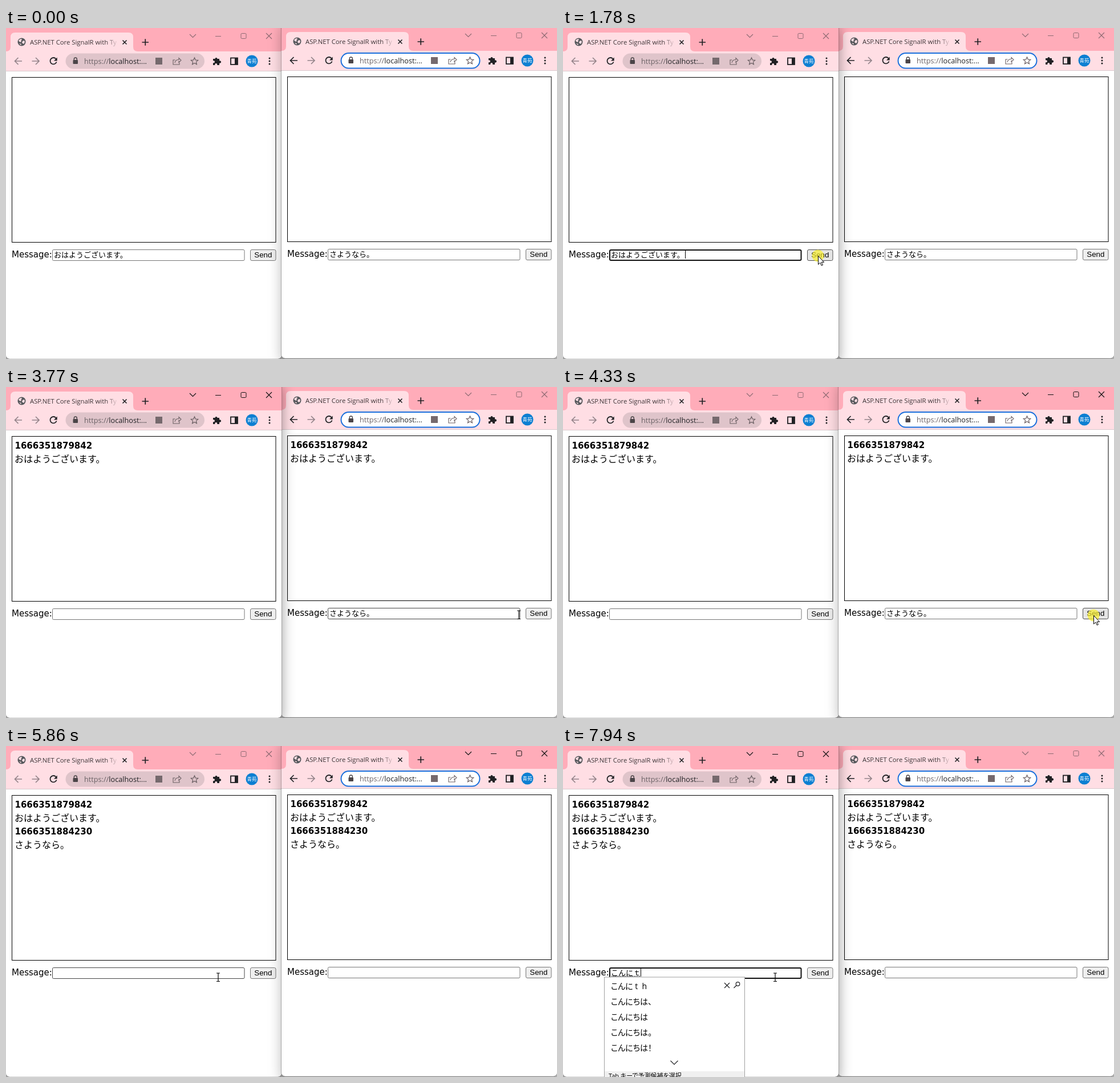
Recreate the animation shown at these times as an HTML page. Size 966x580 px, loop 8 s.

```html
<!DOCTYPE html>
<html lang="ja">
<head>
<meta charset="utf-8">
<title>Chat demo</title>
<style>
html, body { margin: 0; width: 100%; height: 100%; overflow: hidden; background: #c4c4c4; }
svg { display: block; width: 966px; height: 580px; }
text { white-space: pre; }
.ui { font-family: "Open Sans", "Noto Sans CJK JP", "Noto Sans CJK", sans-serif; }
.page { font: 15px "DejaVu Sans", sans-serif; }
.bold { font-weight: bold; }
.jp { font: 16px "Noto Sans CJK JP", "Noto Sans CJK", sans-serif; }
.field { font-size: 13px; }
.send { font: 13.333px "Liberation Sans", Arial, sans-serif; }
.ime { font-size: 14px; font-feature-settings: "palt"; }
.line { fill: none; stroke: #202124; }
</style>
</head>
<body>
<svg id="stage" viewBox="0 0 966 580"></svg>
<script>
const stage = document.getElementById('stage');
const LOOP = 8000;
const HELLO = 'おはようございます。', BYE = 'さようなら。';

// Pointer keys: time, x, y
const pointerPath = [
  [660, 522, 559], [950, 492, 486], [1250, 451, 408], [1450, 447, 399],
  [2650, 447, 399], [2850, 500, 421], [3200, 740, 424], [3490, 828, 425],
  [3500, 828, 425], [3770, 899, 399], [3900, 922, 397], [4200, 930, 400],
  [4610, 930, 400], [4810, 890, 407], [5200, 560, 421], [5440, 448, 422],
  [5640, 395, 412], [5860, 372, 405]
];
const typed = [[7000, 'ｋ'], [7130, 'こ'], [7400, 'こｎ'], [7540, 'こん'], [7600, 'こんに'], [7940, 'こんにｔ']];
const candidates = [
  [7200, ['これ h', 'Tavu', 'こっちで', 'コミュニケーション', 'こんにちは']],
  [7670, ['こんに t  h', 'こんにちは、', 'こんにちは', 'こんにちは。', 'こんにちは！']]
];

const between = (t, a, b) => t >= a && t < b;
const latest = (list, t) => list.reduce((value, [at, next]) => t >= at ? next : value, null);
const text = (x, y, cls, content, extra = '') => `<text x="${x}" y="${y}" class="${cls}" ${extra}>${content}</text>`;
const line = (d, width = 1, color = '#202124') => `<path class="line" d="${d}" stroke-width="${width}" style="stroke:${color}"/>`;
const rect = (x, y, w, h, fill, extra = '') => `<rect x="${x}" y="${y}" width="${w}" height="${h}" fill="${fill}" ${extra}/>`;

function pointerAt(t) {
  const next = pointerPath.findIndex(key => key[0] > t);
  if (next < 0) return pointerPath.at(-1).slice(1);
  if (!next) return pointerPath[0].slice(1);
  const [t0, x0, y0] = pointerPath[next - 1], [t1, x1, y1] = pointerPath[next];
  const k = (t - t0) / (t1 - t0);
  return [x0 + (x1 - x0) * k, y0 + (y1 - y0) * k];
}

function browserBar(right, active) {
  const control = active ? '#111' : '#8d6a72', icon = '#6b5f63';
  return rect(-1, -9, 485, 50, '#ffacb9') + rect(-1, 41, 485, 34, '#ffdee4') +
    '<path d="M0 41Q8 41 8 33V16Q8 8 16 8H215Q223 8 223 16V33Q223 41 231 41Z" fill="#ffdee4"/>' +
    '<circle cx="27.5" cy="24.5" r="7" fill="#55585c"/>' +
    '<path d="M22 22q2-3 5-3q2 2-1 3l1 2q-3 2-5-2M29 23l3-1q2 3-1 6l-3-2M23 27l4 1-1 2" fill="#ffdee4"/>' +
    text(42, 29, 'ui', 'ASP.NET Core SignalR with Ty', 'font-size="11.3" fill="url(#fade)"') +
    line('M204.5 21.5l7 7m0-7l-7 7', 1.6) + line('M238.500 25h11.500m-5.750-5.750v11.500', 1.7) +
    line('M322 11l5.500 5.500 5.500-5.500M367 14.500h10M456 9l10 10m0-10l-10 10', 1.1, control) +
    `<rect x="412" y="9.500" width="9" height="9" rx="1.500" class="line" style="stroke:${control}"/>` +
    line('M28 58H15.500m6-6l-6 6 6 6', 1.7, right ? '#202124' : '#94848a') +
    line('M45.500 58H58m-6-6l6 6-6 6', 1.7, '#94848a') +
    line('M87.500 54A5.700 5.700 0 1 0 88.600 59.500', 1.8) + '<path d="M89.700 51.500V57.500H84Z" fill="#202124"/>' +
    (right
      ? rect(104.5, 45, 243, 26.500, '#fff', 'rx="13.300" stroke="#1a6fdc" stroke-width="2"')
      : rect(104.5, 44.500, 243.500, 27, '#dfc4ca', 'rx="13.500"')) +
    rect(117.5, 56, 8.500, 7, '#4b4548', 'rx="1"') + line('M119.300 56v-1.500a2.500 2.500 0 0 1 5 0V56', 1.4, '#4b4548') +
    text(137, 62.500, 'ui', '<tspan fill="#6b6266">https://</tspan>localhost:...', 'font-size="12.700" fill="#202124"') +
    rect(262, 52, 12, 12, '#75696d') +
    line('M296.500 56h-3.500v8h11v-3M296 61q1-5.500 7-5.500v-3l4 4-4 4v-3', 1.1, icon) +
    line('M330.500 52l1.800 4.100 4.400.400-3.300 2.900 1 4.400-3.900-2.300-3.900 2.300 1-4.400-3.300-2.900 4.400-.400Z', 1.2, icon) +
    '<path d="M363 54h3.500a2 2 0 1 1 4 0H374v3.500a2.200 2.200 0 1 1 0 4V65h-4a2 2 0 1 0-3.500 0H363v-4a2 2 0 1 0 0-3.500Z" fill="#202124"/>' +
    rect(394, 52.500, 12, 11.500, 'none', 'stroke="#202124" stroke-width="1.800"') + rect(401, 52.500, 5, 11.500, '#202124') +
    '<circle cx="431" cy="58" r="10.500" fill="#0c7fd2"/>' +
    text(431, 61.200, 'ui', '青苑', 'font-size="8.500" fill="#fff" text-anchor="middle"') +
    [53, 58, 63].map(y => `<circle cx="462" cy="${y}" r="1.500" fill="#202124"/>`).join('') +
    rect(-1, 75, 485, 1, '#d8c8cc');
}

function browserWindow(s) {
  const { right, messages, value, focus, caret, hoverInput, hoverSend } = s;
  const log = messages.map(([stamp, body], i) =>
    text(15.5, 108 + i * 46.500, 'page bold', stamp) + text(15, 132 + i * 46.500, 'jp', body)).join('');
  const input = focus
    ? rect(82, 389, 335.500, 18, '#fff', 'rx="2" stroke="#101010" stroke-width="2"')
    : rect(81.5, 388.500, 336.500, 19, '#fff', `rx="2" stroke="${hoverInput ? '#454545' : '#767676'}"`);
  const send = rect(428.5, 388.500, 44.500, 19, hoverSend ? '#e5e5e5' : '#efefef', `rx="2.500" stroke="${hoverSend ? '#4f4f4f' : '#767676'}"`);
  return `<g transform="translate(${right ? '483 -1' : '0 0'})">` +
    rect(-0.5, -10, 484, 590, '#fff', `rx="7" style="filter:drop-shadow(0 7px 11px ${right ? '#0004' : '#0006'})"`) +
    browserBar(right, s.active) +
    rect(10.5, 86.500, 462.500, 289, '#fff', 'stroke="#000"') + log +
    text(10, 402, 'page', 'Message:') + input + text(84, 401.500, 'jp field', value) +
    (caret ? rect(84 + [...value].length * 13, 390, 1, 14, '#000') : '') +
    send + text(435.3, 402, 'send', 'Send') +
    rect(-0.5, -10, 484, 590, 'none', 'rx="7" stroke="#000" stroke-opacity=".3"') + '</g>';
}

function imePopup(rows) {
  return rect(72.5, 405, 246, 190, '#fff', 'stroke="#a0a0a0"') +
    rows.map((row, i) => text(84, 426 + i * 27, 'ui ime', row)).join('') +
    line('M283 415l9 9m0-9l-9 9M188.500 551.500l6.500 6.500 6.500-6.500', 1.2) +
    '<circle cx="306.500" cy="417" r="3.300" class="line" stroke-width="1.200"/>' + line('M304 419.500l-4.500 4.500', 1.3) +
    rect(73, 570, 245, 10, '#f0f0f0') +
    text(80, 582, 'ui ime', 'Tab キーで予測候補を選択', 'style="font-size:11px"');
}

function pointer(x, y) {
  const local = x > 483 ? [x - 483, y + 1] : [x, y];
  const onInput = local[0] > 81 && local[0] < 418 && local[1] > 387 && local[1] <= 408.500;
  const shape = onInput
    ? line('M-3-7h2.500l.500.500.500-.500H3M-3 7.500h2.500l.500-.500.500.500H3M0-6.500V7', 1.2, '#000')
    : '<path d="M.5.500V15.300L3.900 12.200 6.200 17.300 8.400 16.300 6.100 11.400H10.600Z" fill="#fff" stroke="#000"/>';
  return `<g transform="translate(${x.toFixed(1)} ${y.toFixed(1)})">${shape}</g>`;
}

function scene(t) {
  const [x, y] = pointerAt(t);
  const shown = t >= 560;
  const messages = [];
  if (t >= 1910) messages.push(['1666351879842', HELLO]);
  if (t >= 4400) messages.push(['1666351884230', BYE]);
  const composing = latest(typed, t) || '';
  const over = (x0, x1, y0) => shown && x > x0 && x < x1 && y > y0 && y <= y0 + 20.500;
  const left = browserWindow({
    right: false, messages,
    active: between(t, 1850, 4270) || t >= 6060,
    value: t < 1910 ? HELLO : composing,
    focus: between(t, 1780, 1910) || t >= 5990,
    caret: between(t, 1780, 1910) || between(t, 5990, 6520) || t >= 7000,
    hoverInput: over(81, 418, 387), hoverSend: over(428, 473, 387)
  });
  const right = browserWindow({
    right: true, messages,
    active: between(t, 4330, 6060),
    value: t < 4400 ? BYE : '',
    hoverInput: over(564, 901, 386.5), hoverSend: over(911, 956, 386)
  });
  const leftOnTop = between(t, 1780, 4270) || t >= 5990;
  const pressed = between(t, 1780, 1910) || between(t, 4270, 4400) || between(t, 5990, 6060);
  const rows = latest(candidates, t);
  return '<defs><linearGradient id="fade" gradientUnits="userSpaceOnUse" x1="176" x2="197" y1="0" y2="0">' +
    '<stop stop-color="#3c3437"/><stop offset="1" stop-color="#3c3437" stop-opacity="0"/></linearGradient></defs>' +
    (leftOnTop ? right + left : left + right) +
    (composing ? `<path class="line" d="M85 403.500h${[...composing].length * 13 - 2}" stroke-dasharray="2 1"/>` : '') +
    (rows ? imePopup(rows) : '') +
    (pressed ? `<circle cx="${x}" cy="${y}" r="10.500" fill="#f8ee2c" fill-opacity=".7"/>` : '') +
    (shown ? pointer(x, y) : '');
}

let drawn = '';
function draw(now) {
  const markup = scene(now % LOOP);
  if (markup !== drawn) stage.innerHTML = drawn = markup;
  requestAnimationFrame(draw);
}
draw(performance.now());
</script>
</body>
</html>
```
